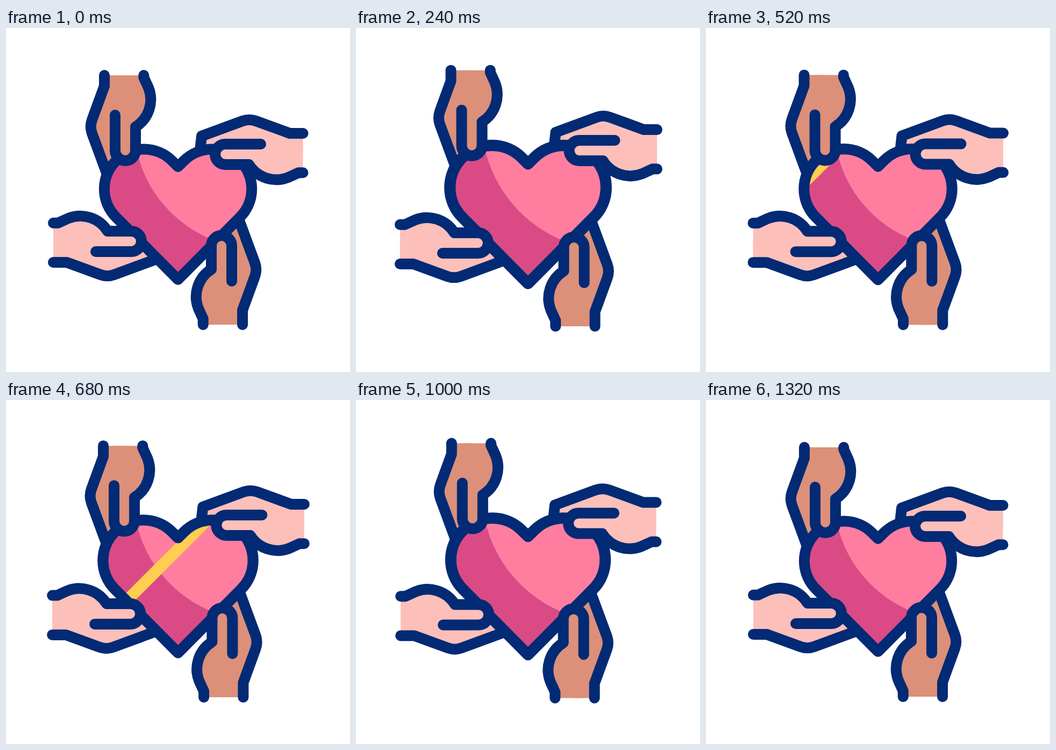
Recreate the animation shown at these times as an HTML page. Size 640 by 640 pixels, loop 1400 ms.

```html
<!DOCTYPE html>
<html lang="en">
<head>
<meta charset="utf-8">
<title>Hands around a heart</title>
<style>
  html, body { margin: 0; width: 100%; height: 100%; overflow: hidden; background: #fff; }
  svg { display: block; width: 100%; height: 100%; }
  .line { fill: none; stroke: #032a74; stroke-width: 20; stroke-linecap: round; stroke-linejoin: round; }
</style>
</head>
<body>
<svg viewBox="0 0 640 640">
  <defs>
    <path id="outline" d="M320 468L204.5 351.7A73 73 0 0 1 309.1 247.2L320 258L330.9 247.2A73 73 0 0 1 435.5 351.7Z"/>
    <clipPath id="inside"><use href="#outline"/></clipPath>
  </defs>
  <g id="backs"></g>
  <g id="heart">
    <g clip-path="url(#inside)">
      <use href="#outline" fill="#ff7ea0"/>
      <path fill="#da4b86" d="M244 230A230 230 0 0 0 385 394L320 490L150 400V200Z"/>
      <path id="shine" d="M-600 600L0 0" stroke="#ffcd4f" stroke-width="21.2"/>
    </g>
    <use href="#outline" class="line"/>
  </g>
  <g id="thumbs"></g>
</svg>
<script>
const LOOP = 1400, STEP = 40, LAST = 1320;
const PALE = '#fdbfba', BROWN = '#dc9079';
const byId = id => document.getElementById(id);

// All hands share one shape; they differ in wrist position, placement and push direction.
// "bend" slides the knuckle along the back of the hand during a beat.
const hands = [
  { skin: PALE,  wrist: 552.5, place: '1 0 0 1 0 0',       push: [7.9, -7.3],  bend: 0 },
  { skin: PALE,  wrist: 553,   place: '-1 0 0 -1 641 632', push: [-6.4, 3.2],  bend: 0 },
  { skin: BROWN, wrist: 548,   place: '0 -1 1 0 -13 636',  push: [-6.8, -9.8], bend: 7.5 },
  { skin: BROWN, wrist: 555,   place: '0 1 -1 0 636 -3',   push: [4.8, 3.2],   bend: 0 }
];

function addPart(layer, { skin, place }) {
  const g = document.createElementNS('http://www.w3.org/2000/svg', 'g');
  g.innerHTML = `<g transform="matrix(${place})"><path fill="${skin}"/><path class="line"/></g>`;
  byId(layer).append(g);
  return g;
}

function shape(part, line, closing) {
  const [fill, stroke] = part.querySelectorAll('path');
  fill.setAttribute('d', line + closing);
  stroke.setAttribute('d', line);
}

function shapeBack({ back, wrist }, slide) {
  const at = (x, y) => `${x + slide} ${y + slide * 0.365}`;
  shape(back, `M${wrist} 196H528L${at(465, 173)}Q${at(452.5, 168.5)} ${at(440, 173)}` +
    `L${at(364, 201)}L361 228`, `L408 235H${wrist}Z`);
}

for (const hand of hands) {
  hand.back = addPart('backs', hand);
  hand.thumb = addPart('thumbs', hand);
  shape(hand.thumb,
    `M474 216H408A19 19 0 0 0 408 254H452A60 60 0 0 0 525 278L544 269.3H${hand.wrist}`, 'V216Z');
}

// Smooth rise from start to peak, then fall to end.
function pulse(t, start, peak, end) {
  if (t <= start || t >= end) return 0;
  const x = t < peak ? (peak - t) / (peak - start) : (t - peak) / (end - peak);
  return (1 + Math.cos(Math.PI * x)) / 2;
}

function draw(now) {
  const t = Math.min(LAST, Math.floor(now % LOOP / STEP) * STEP);
  const beat = pulse(t, 0, 280, 565) + pulse(t, 567, 880, 1250);

  for (const hand of hands) {
    const [dx, dy] = hand.push;
    shapeBack(hand, hand.bend * beat);
    for (const part of [hand.back, hand.thumb])
      part.setAttribute('transform', `translate(${dx * beat} ${dy * beat})`);
  }

  byId('heart').setAttribute('transform',
    `translate(320 345) scale(${1 + 0.063 * beat}) translate(-320 -345)`);

  const u = t - 680;
  byId('shine').setAttribute('transform', `translate(${599 + 0.931 * u + 0.00082 * u * u} 0)`);
}

const begin = performance.now();
function tick() {
  draw(performance.now() - begin);
  requestAnimationFrame(tick);
}
tick();
</script>
</body>
</html>
```
